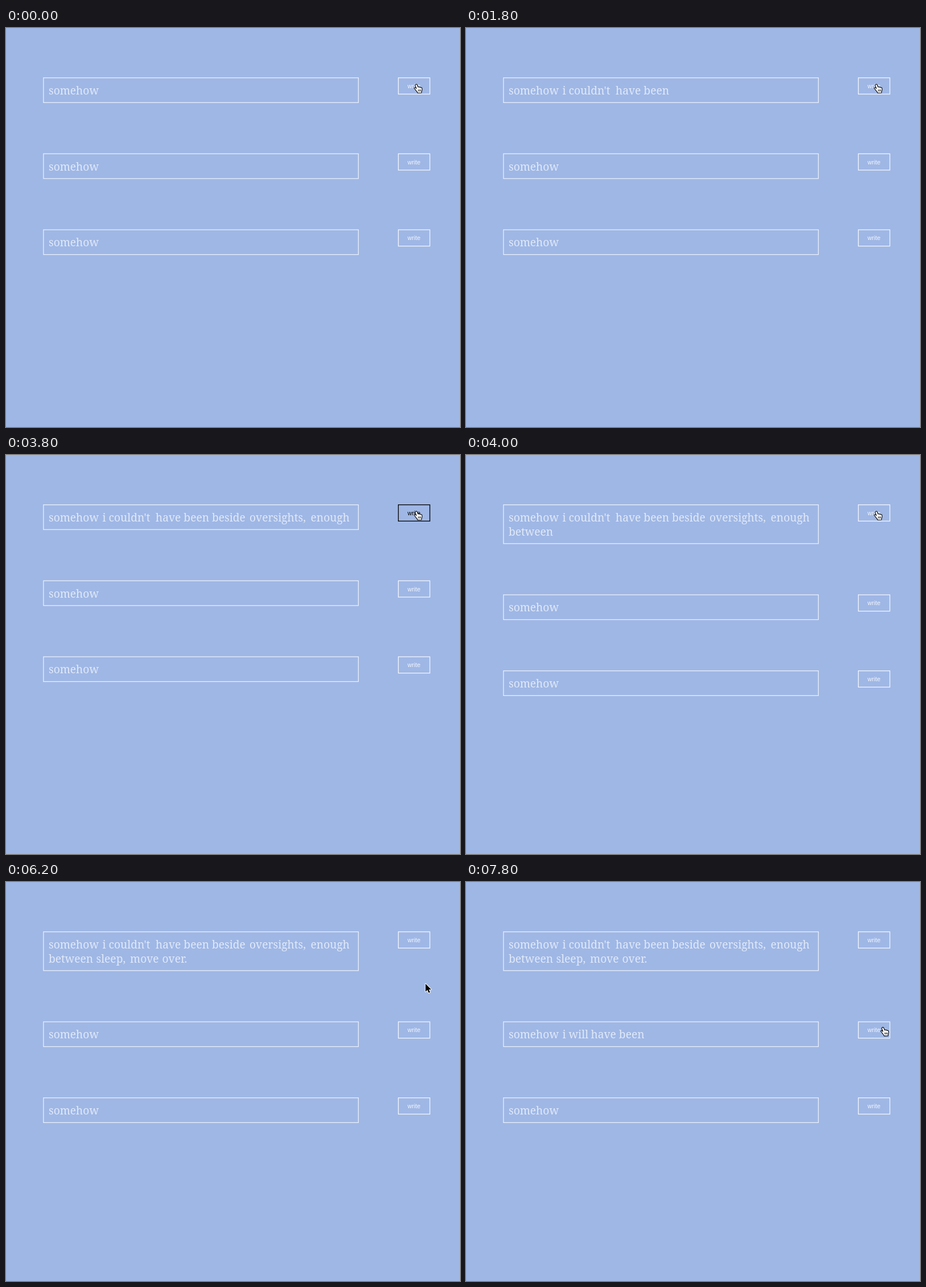
An HTML page with a canvas for the animation above (8000 ms loop, 798 by 702 pixels).

```html
<!DOCTYPE html>
<html lang="en">
<head>
<meta charset="utf-8">
<title>Write</title>
<style>
  html, body { margin: 0; width: 100%; height: 100%; overflow: hidden; background: #9fb7e5; }
  canvas { display: block; }
</style>
</head>
<body>
<canvas id="stage" width="798" height="702"></canvas>
<script>
const ctx = document.getElementById('stage').getContext('2d');
const LOOP = 8000;
const PITCH = 133.7, LINE = 24.7;
const WRAP_AT = 4000;

// [time, row, line, x, text]
const words = [
  [0, 0, 0, 75, 'somehow'],
  [0, 1, 0, 75, 'somehow'],
  [0, 2, 0, 75, 'somehow'],
  [600, 0, 0, 169.5, 'i'],
  [1400, 0, 0, 180.5, "couldn't"],
  [1800, 0, 0, 263, 'have been'],
  [2400, 0, 0, 362, 'beside'],
  [3000, 0, 0, 428, 'oversights,'],
  [3400, 0, 0, 535.5, 'enough'],
  [WRAP_AT, 0, 1, 75, 'between'],
  [4400, 0, 1, 158.5, 'sleep,'],
  [5000, 0, 1, 218, 'move'],
  [5600, 0, 1, 274.5, 'over.'],
  [6800, 1, 0, 169.5, 'i'],
  [7400, 1, 0, 180.5, 'will'],
  [7800, 1, 0, 219.5, 'have been']
];

// Start times of each 200 ms press, per row
const presses = [
  [400, 1200, 2200, 2800, 3800, 4800, 5400],
  [6600, 7200, 7600],
  []
];

const hand = new Path2D(
  'M3.2 1.6 C4.2 .6 5.6 .9 6.1 2.2 L7.6 6 C8.2 5.2 9.6 5.3 10 6.3' +
  'C10.8 5.6 12 5.9 12.3 6.9 C13.2 6.4 14.3 6.9 14.5 8 C14.9 9.8 14.9 11.4 14 13' +
  'L13.6 16 L6.8 16.3 C6.4 14.6 5 13.4 4 12 C3 10.6 2.4 9.6 1.2 8.6' +
  'C.2 7.6 1.4 6.4 2.6 6.9 L4.6 8.4 L2.6 3.2 C2.4 2.6 2.7 2 3.2 1.6 Z');
const creases = new Path2D('M8 10.2 L8.2 13.6 M10.1 10.2 L10.2 13.6 M12.1 10.2 L12.1 13.6');
const arrow = new Path2D('M0 0 L0 14 L3.3 11 L5.6 16 L8 15 L5.8 10.2 L10 10.2 Z');

function box(x, y, w, h, color) {
  ctx.strokeStyle = color;
  ctx.lineWidth = 1.3;
  ctx.strokeRect(x, y, w, h);
}

function drawRow(row, y, extra, pressed) {
  box(65.9, y + 0.6, 553.5, 43.6 + extra, '#e9effb');
  const ink = pressed ? '#000' : '#f1f5fd';
  box(689.6, y + 0.6, 55.4, 28.7, ink);
  ctx.font = '10.67px "Liberation Sans", Arial, sans-serif';
  ctx.textAlign = 'center';
  ctx.fillStyle = ink;
  ctx.fillText('write', 717.1, y + 19);
}

function drawCursor(t) {
  const away = t >= 6200 && t < 6400;
  ctx.save();
  ctx.lineJoin = 'round';
  if (away) {
    ctx.translate(737.4, 179);
    ctx.strokeStyle = '#fff';
    ctx.lineWidth = 2;
    ctx.stroke(arrow);
    ctx.fillStyle = '#000';
    ctx.fill(arrow);
  } else {
    if (t < 6200) ctx.translate(716.7, 98);
    else ctx.translate(728.2, 254.6);
    ctx.fillStyle = '#fff';
    ctx.fill(hand);
    ctx.strokeStyle = '#000';
    ctx.lineWidth = 1.1;
    ctx.stroke(hand);
    ctx.lineWidth = 0.9;
    ctx.stroke(creases);
  }
  ctx.restore();
}

function draw(t) {
  const grow = t >= WRAP_AT ? LINE : 0;
  const rowY = row => 87 + row * PITCH + (row ? grow : 0);

  ctx.fillStyle = '#9fb7e5';
  ctx.fillRect(0, 0, 798, 702);

  presses.forEach((starts, row) => {
    const pressed = starts.some(s => t >= s && t < s + 200);
    drawRow(row, rowY(row), row ? 0 : grow, pressed);
  });

  ctx.font = '19.2px "Noto Serif", Georgia, serif';
  ctx.textAlign = 'left';
  ctx.fillStyle = '#e1e9f8';
  for (const [time, row, line, x, text] of words) {
    if (t >= time) ctx.fillText(text, x, rowY(row) + 30 + line * LINE);
  }

  drawCursor(t);
}

const start = performance.now();
function tick() {
  draw((performance.now() - start) % LOOP);
  requestAnimationFrame(tick);
}
tick();
</script>
</body>
</html>
```
